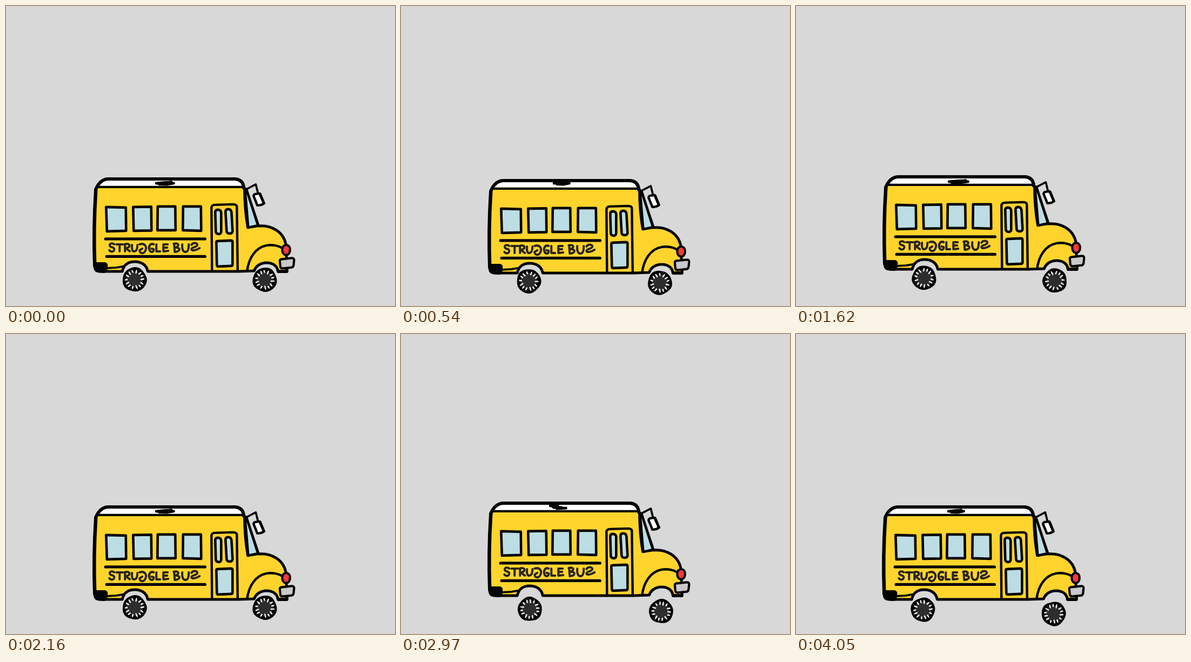
An HTML page with a canvas for the animation above (4320 ms loop, 720x555 px).

```html
<!DOCTYPE html>
<html lang="en">
<head>
<meta charset="utf-8">
<title>Bumpy bus</title>
<style>
html, body { margin: 0; width: 100%; height: 100%; overflow: hidden; background: #d8d8d8; }
canvas { display: block; width: 720px; height: 555px; }
</style>
</head>
<body>
<canvas id="stage" width="720" height="555" role="img" aria-label="Struggle bus"></canvas>
<script>
const ctx = document.getElementById('stage').getContext('2d');
const STEP = 270;
const GREY = '#d8d8d8', INK = '#030303', YELLOW = '#ffd42d', GLASS = '#bcdde4';

// One pose per step: body shift, wheel centres, roof scribble [left, right, y, tail]
const poses = [
  { body: [0, 0],   rear: [238, 506],   front: [479, 506.5],   mark: [278, 310, 327, 0] },
  { body: [0, -11], rear: [236, 506.5], front: [479, 506],     mark: [276, 305, 326, 1] },
  { body: [0, 3],   rear: [236.5, 509], front: [479, 512],     mark: [283, 311, 324, 0] },
  { body: [0, -7],  rear: [238.5, 509], front: [481.5, 513],   mark: [276, 305, 326, 1] },
  { body: [-1, 3],  rear: [237, 508],   front: [482, 513],     mark: [279, 310, 328, 0] },
  { body: [0, -1],  rear: [236, 509],   front: [479, 517.5],   mark: [280, 312, 327, 0] },
  { body: [0, -4],  rear: [237, 503],   front: [479, 508],     mark: [283, 318, 328, 0] },
  { body: [-1, 0],  rear: [235, 510],   front: [477, 517.5],   mark: [283, 311, 327, 0] }
];

const shell = 'M164 480 C162 430 163 385 166 339 C171 326 178 319 190 319 L422 319 C434 319 439 326 440 336' +
  ' L444 338 L467 406 C490 404 514 416 518 442 L519 470 L520 490 L503 490 C502 480 494 474 482 474' +
  ' C470 474 462 481 459 489 L430 490 L262 490 C260 478 250 472 238 472 C225 472 217 479 215 490' +
  ' L174 490 C167 490 164 488 164 480 Z';
const roof = 'M169 334 C173 327 179 321 190 320 L422 320 C433 320 437 326 439 334 Z';
const panes = [
  'M185 371 L221.5 372 L222 415 L186.5 416 Z',
  'M235 371 L268.5 370.5 L269 414.5 L236 415 Z',
  'M280.5 370 L313 370 L313.5 414 L280 414 Z',
  'M327.5 370 L360.5 370 L361 415 L327 414 Z',
  'M387 381 Q387 376 392 376 Q397 376 398 381 L398 416 Q398 421 393 421 Q388 420 388 416 Z',
  'M406 380 Q406 375 411 375 Q416 375 417 380 L419 415 Q419 420 414 420 Q408 420 408 415 Z',
  'M389 436 Q389 434 392 434 L416 433 Q419 433 419 436 L419 477 Q419 480 416 480 L393 481 Q390 481 390 478 Z',
  'M442 338 L445 339 L466 405 L448 409 Z'
];
// STRUGGLE BUS, with the first G and the last S turned round
const letters = [
  'M200 440 C197 437 190 438 192 443 C194 447 201 444 200 450 C199 455 193 454 191 451',
  'M204 440 L216 440 M210 441 L210 453',
  'M220 440 L220 453 M219 440 C231 436 231 447 221 447 L229 453',
  'M233 441 C232 450 234 454 238 453 C242 452 243 447 243 441',
  'M247 440 C256 437 261 444 258 451 C255 459 247 457 247 451 L252 448',
  'M273 440 C267 437 263 444 265 450 C267 456 274 455 273 449 L269 448',
  'M278 440 L278 453 L285 453',
  'M299 440 L291 440 L291 453 L300 452 M291 446 L298 446',
  'M311 439 L312 454 M310 439 C321 436 321 445 312 446 C324 445 323 454 312 454',
  'M326 440 C325 450 328 455 333 454 C337 453 338 447 338 440',
  'M343 441 C346 436 354 437 354 441 C353 446 343 445 343 449 C344 453 352 451 358 447'
].join(' ');

function fill(d, color) {
  ctx.fillStyle = color;
  ctx.fill(new Path2D(d));
}

function line(d, width = 4.4, color = INK) {
  ctx.strokeStyle = color;
  ctx.lineWidth = width;
  ctx.stroke(new Path2D(d));
}

function shape(d, color, width) {
  fill(d, color);
  line(d, width);
}

function scribble([left, right, y, tail]) {
  if (tail) {
    line(`M${left} ${y - 2} L290 ${y - 3} L${left + 6} ${y + 1} L297 ${y + 1}`, 5);
    line(`M288 ${y + 3} L${right} ${y + 2}`, 5);
    return;
  }
  const mid = (left + right) / 2;
  line(`M${left} ${y} L${mid} ${y - 1.5} L${right - 4} ${y - 2} L${left + 5} ${y + 1.5} L${mid + 4} ${y + 2} L${right} ${y}`, 5);
}

function mirror() {
  line('M443 339 L462 329 L466 345', 3.8);
  shape('M458 351 Q458 348 461 347 L469 346 L477 364 Q473 368 465 368 Q462 360 458 351 Z', '#fff', 4.4);
  line('M470 347 L477 364', 5);
}

function nose() {
  line('M446 489 C449 466 461 446 482 442 C494 440 505 443 511 447');
  line('M504 490 L519 490', 6);
  shape('M511 450 C511 438 525.5 438 525.5 450 C525.5 463 511 463 511 450 Z', '#f3393e', 4);
  shape('M506.5 471 Q506 468 510 467.5 L528 465.5 Q533 465 533 469 L532 479 Q531 483 527 483 L513 484.5 Q508 485 507.5 481 Z', '#c9c9cb', 4.2);
}

function drawBody({ body: [x, y], mark }) {
  ctx.save();
  ctx.translate(x + 0.3, y + 0.9);
  mirror();
  fill(shell, YELLOW);
  fill(roof, '#fff');
  line(shell, 5);
  line('M164 480 C162 430 163 385 166 339', 6.5);
  line('M166 338 C171 326 178 319 190 319 L422 319 C434 319 439 326 440 336', 6);
  line('M168 334 L440 334');
  scribble(mark);

  line('M441 336 C441 365 444 392 447 409 L467 406');
  panes.forEach(d => shape(d, GLASS, 4.6));
  line('M381 489 L380 372 Q381 367 386 367 L420 366 Q427 366 427 371 L428.5 489');
  line('M184 430 L368 430 M186 462.5 L368 462.5', 5.4);
  line(letters, 4, '#29251f');

  fill('M165 473 L183 473 Q188 474 188 479 L187 489 Q186 493 180 493 L170 492 Q165 490 165 484 Z', INK);
  line('M187 484 L204 483 L216 481', 3.8);
  nose();
  ctx.restore();
}

function drawWheel([x, y], turn) {
  ctx.save();
  ctx.translate(x, y);
  ctx.rotate(turn);
  ctx.beginPath();
  for (let i = 0; i < 48; i++) {
    const a = i * Math.PI / 24;
    const r = 22.4 + 0.5 * Math.sin(3 * a) + 0.4 * Math.cos(5 * a);
    ctx.lineTo(r * Math.cos(a), r * Math.sin(a));
  }
  ctx.fillStyle = INK;
  ctx.fill();
  ctx.beginPath();
  ctx.arc(0, 0, 15.5, 0, 2 * Math.PI);
  ctx.fillStyle = '#2d2d2d';
  ctx.fill();
  const ticks = 14;
  for (let i = 0; i < ticks; i++) {
    ctx.rotate(2 * Math.PI / ticks);
    line(`M${13 + Math.sin(i * 2.3)} 0 L17 ${Math.cos(i * 1.7)}`, 2.4, '#f4f4f4');
  }
  ctx.restore();
}

function draw(time) {
  const step = Math.floor(time / STEP) % poses.length;
  const pose = poses[step];
  ctx.fillStyle = GREY;
  ctx.fillRect(0, 0, 720, 555);
  ctx.lineCap = ctx.lineJoin = 'round';
  drawBody(pose);
  drawWheel(pose.rear, step * 0.7);
  drawWheel(pose.front, step * 0.7 + 0.2);
}

const start = performance.now();
function tick() {
  draw(performance.now() - start);
  requestAnimationFrame(tick);
}
tick();
</script>
</body>
</html>
```
